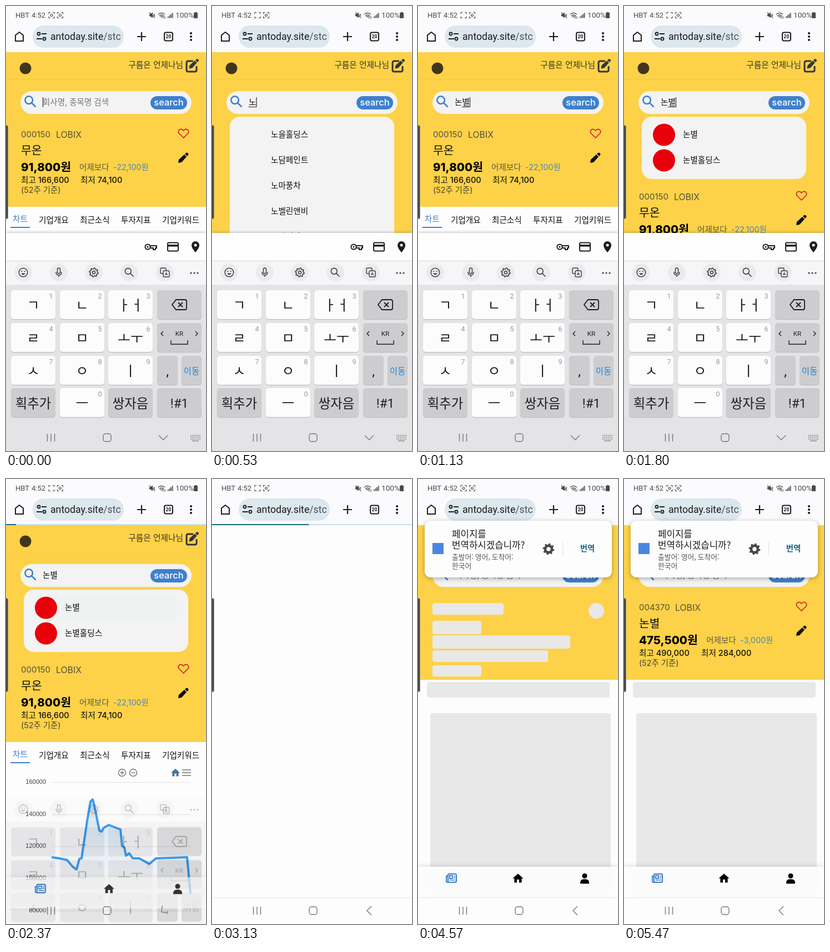
Animation of 360 by 800 pixels, one loop 5.51 s. Source, as an HTML page with a canvas:

```html
<!DOCTYPE html>
<html lang="ko">
<head>
<meta charset="utf-8">
<title>종목 검색</title>
<style>
html,body{margin:0;width:100%;height:100%;overflow:hidden;background:#fdfdfd}
canvas{display:block;width:360px;height:800px}
</style>
</head>
<body>
<canvas id="stage"></canvas>
<script>
const LOOP = 5510;
const cv = document.getElementById('stage');
const c = cv.getContext('2d');
const dpr = window.devicePixelRatio || 1;
cv.width = 360 * dpr;
cv.height = 800 * dpr;

const APP = 'Inter,"Noto Sans CJK KR",sans-serif';
const SYS = 'Roboto,"Noto Sans CJK KR",sans-serif';
const KOR = '"Noto Sans CJK KR","Noto Sans CJK",sans-serif';
const BLUE = '#3f80cc', INK = '#1d1d1f';

const TYPED = [[0, ''], [110, 'ㄴ'], [260, '노'], [640, '논'], [800, '논ㅂ'], [930, '논벼'], [1060, '논별']];
const LONG_LIST = ['노을홀딩스', '노담페인트', '노마풍차', '노벨린앤비', '노아린텍'];
const SHORT_LIST = ['논별', '논별홀딩스'];
const OLD = { code: '000150', x: 90, name: '무온', price: '91,800원', dx: 132, vx: 193, diff: '-22,100원', hi: '166,600', lx: 134, lo: '74,100' };
const NEW = { code: '004370', x: 92, name: '논별', price: '475,500원', dx: 148, vx: 209, diff: '-3,000원', hi: '490,000', lx: 139, lo: '284,000' };
const LINE = [[82,680],[96,682],[110,685],[120,697],[127,702],[132,683],[136,682],[146,615],[152,580],[156,576],[160,592],
  [168,632],[172,634],[176,627],[185,622],[206,630],[209,660],[213,662],[216,677],[222,673],[228,682],[240,682],
  [258,692],[270,682],[326,680],[332,745]];
const BAR = [[2340, 0], [2370, 18], [2800, 92], [3130, 174], [3700, 335], [3830, 335]];

const clamp = v => Math.max(0, Math.min(1, v));
const span = (t, a, b) => clamp((t - a) / (b - a));

function track(pts, t) {
  for (let i = 1; i < pts.length; i++) {
    const [a, u] = pts[i - 1], [b, v] = pts[i];
    if (t <= b) return u + (v - u) * span(t, a, b);
  }
  return pts[pts.length - 1][1];
}

function text(s, x, y, size, color = INK, font = APP, weight = 400, align = 'left') {
  c.font = `${weight} ${size}px ${font}`;
  c.fillStyle = color;
  c.textAlign = align;
  c.fillText(s, x, y + size * 0.365);
}
function rect(x, y, w, h, color) {
  c.fillStyle = color;
  c.fillRect(x, y, w, h);
}
function box(x, y, w, h, r, fill, stroke, lw = 2) {
  c.beginPath();
  c.roundRect(x, y, w, h, r);
  if (fill) { c.fillStyle = fill; c.fill(); }
  if (stroke) { c.strokeStyle = stroke; c.lineWidth = lw; c.stroke(); }
}
function disc(x, y, r, fill, stroke, lw = 2) {
  box(x - r, y - r, 2 * r, 2 * r, r, fill, stroke, lw);
}
// SVG path moved to x,y
function path(x, y, d, fill, stroke, lw = 2) {
  c.save();
  c.translate(x, y);
  const p = new Path2D(d);
  if (fill) { c.fillStyle = fill; c.fill(p, 'evenodd'); }
  if (stroke) { c.strokeStyle = stroke; c.lineWidth = lw; c.stroke(p); }
  c.restore();
}
function shadowed(blur, dy, color, draw) {
  c.save();
  c.shadowColor = color;
  c.shadowBlur = blur * dpr;
  c.shadowOffsetY = dy * dpr;
  draw();
  c.restore();
}
function magnifier(x, y, r, color, lw) {
  disc(x - r * 0.3, y - r * 0.3, r * 0.72, null, color, lw);
  path(x, y, `M${r * 0.25} ${r * 0.25}L${r} ${r}`, null, color, lw);
}
function gear(x, y, r, color, solid) {
  c.beginPath();
  for (let i = 0; i < 32; i++) {
    const a = (i + 0.5) / 32 * Math.PI * 2, q = i % 4 < 2 ? r : r * 0.77;
    c.lineTo(x + Math.cos(a) * q, y + Math.sin(a) * q);
  }
  c.closePath();
  if (solid) {
    c.moveTo(x + r * 0.36, y);
    c.arc(x, y, r * 0.36, 0, 7);
    c.fillStyle = color;
    c.fill('evenodd');
  } else {
    c.strokeStyle = color;
    c.lineWidth = 1.6;
    c.stroke();
    disc(x, y, r * 0.32, null, color, 1.5);
  }
}
function house(x, y, s, color) {
  c.save();
  c.translate(x, y);
  c.scale(s, s);
  path(0, 0, 'M0-9L10 0H7V8H2V2H-2V8H-7V0H-10Z', color);
  c.restore();
}
function pencil(x, y, s, color) {
  c.save();
  c.translate(x, y);
  c.scale(s, s);
  path(0, 0, 'M-9 9L-8 3L2-6L6-2L-3 8ZM3-7L5-9Q7-10 9-8Q10-6 9-5L7-3Z', color);
  c.restore();
}

function statusBar(t) {
  rect(0, 0, 360, 83, '#fbfbfd');
  const g = '#4a4a4c';
  text('HBT', 17, 16.5, 13, g, SYS);
  text('4:52', 46, 16.5, 13, g, SYS);
  [82, 97.5].forEach((x, i) => {
    path(x, 16.5, 'M-5-2V-5H-2M2-5H5V-2M5 2V5H2M-2 5H-5V2', null, g, 1.1);
    if (i || t < 300 || t >= 3830) disc(x, 16.5, 2, null, g, 1.1);
  });
  path(263, 16.5, 'M-5-2H-3L1-5V5L-3 2H-5Z', g);
  path(263, 16.5, 'M-5-5L5 5M2-2L5 2M5-2L2 2', null, g, 1.1);
  path(280, 17, 'M-6-2Q0-7 6-2M-4 1Q0-3 4 1M-2 3Q0 1 2 3', null, g, 1.4);
  path(284, 20, 'M-1-2V3M2 3V-2', null, g, 1);
  for (let i = 0; i < 4; i++) rect(291 + i * 2.6, 19 - i * 2.2, 1.7, 2.5 + i * 2.2, g);
  text('100%', 305, 16.5, 13.6, g, SYS);
  box(338, 12, 7, 10, 1, g);
  rect(340, 11, 3, 2, g);

  path(24, 55, 'M-7 8V-2.5L0-8L7-2.5V8Z', null, INK, 2);
  box(48, 35, 164, 40, 20, '#dce7ee');
  disc(59, 50, 2.5, null, INK, 1.8);
  disc(69, 59, 2.5, null, INK, 1.8);
  path(64, 55, 'M0-5H9M-9 4H1', null, INK, 1.9);
  text('antoday.site', 80, 55, 17.7, INK, SYS);
  const w = c.measureText('antoday.site').width;
  text('/stc', 80 + w, 55, 17.7, '#4b5459', SYS);
  path(244, 55, 'M-8 0H8M0-8V8', null, INK, 2.2);
  box(285, 47.5, 15, 15, 3, null, INK, 2);
  text('20', 292.5, 55, 8.5, INK, SYS, 700, 'center');
  for (const d of [-6, 0, 6]) disc(333, 55 + d, 2.1, INK);
}

function header(word, caret) {
  rect(0, 131, 360, 1, 'rgba(150,110,0,.1)');
  disc(35, 112, 10.5, '#41351b');
  text('구름은 언제나님', 319, 106, 14.7, '#3a3426', APP, 400, 'right');
  path(335, 107, 'M2-8H-7Q-10-8-10-5V8Q-10 11-7 11H5Q8 11 8 8V1', null, '#33343a', 3);
  pencil(338, 104, 0.95, '#33343a');

  box(26, 153, 308, 41, 20.5, '#f3f3f3');
  magnifier(44, 172, 9.5, BLUE, 2.6);
  if (word) text(word, 66, 173, 14.6, '#111', APP, 500);
  else text('회사명, 종목명 검색', 66, 173, 14.5, '#77777a', APP);
  if (caret) {
    c.font = `500 14.6px ${APP}`;
    const end = 66 + c.measureText(word).width;
    rect(end, 164, 1.2, 18, '#222');
    if (word) rect(end - 14, 181, 14, 1, '#222');
  }
  box(260, 162, 66, 24, 12, BLUE);
  text('search', 293, 173.5, 16.4, '#fff', APP, 500, 'center');
}

function stock(s, dy) {
  const y = v => v + dy;
  text(s.code, 27, y(231), 15, '#55503f');
  text('LOBIX', s.x, y(231), 15.8, '#55503f');
  text(s.name, 27, y(260), 20.5, '#111', APP, 500);
  text(s.price, 27, y(290), 20.5, '#000', APP, 800);
  text('어제보다', s.dx, y(290), 14.6, '#5f5940');
  text(s.diff, s.vx, y(290), 14.4, '#4f86b8');
  text('최고 ' + s.hi, 27, y(312.5), 14.6, '#111', APP, 500);
  text('최저 ' + s.lo, s.lx, y(312.5), 14.6, '#111', APP, 500);
  text('(52주 기준)', 27, y(331), 14.4, '#4a4433');
  path(319.5, y(229), 'M0 8L-8 0C-12-5-5-11 0-5C5-11 12-5 8 0Z', null, '#d0212b', 1.7);
  pencil(319, y(273), 1, '#111');
}

function tabs(dy) {
  [['차트', 12], ['기업개요', 59], ['최근소식', 133], ['투자지표', 207], ['기업키워드', 281]].forEach(([s, x], i) =>
    text(s, x, (i ? 384.5 : 383) + dy, 14.6, i ? '#111' : BLUE, APP, i ? 500 : 400));
  rect(8, 397 + dy, 35, 2, BLUE);
}

function chart(dy) {
  c.save();
  c.translate(0, dy - 112);
  const g = '#6e7479';
  for (const x of [209, 229]) {
    disc(x, 528, 6.5, null, g, 1.4);
    path(x, 528, x < 220 ? 'M-3.5 0H3.5M0-3.5V3.5' : 'M-3.5 0H3.5', null, g, 1.4);
  }
  house(305, 528, 0.8, '#49749c');
  path(325, 528, 'M-8-5H8M-8 0H8M-8 5H8', null, g, 1.7);
  for (let i = 0; i < 5; i++) {
    const y = 545 + i * 57.7;
    rect(82, y, 250, 1, '#e2e2e2');
    text(String(160000 - i * 20000), 72, y - 1, 11, '#444', '"Liberation Sans",sans-serif', 400, 'right');
  }
  c.beginPath();
  LINE.forEach(p => c.lineTo(...p));
  c.strokeStyle = '#3d9ff3';
  c.lineWidth = 4;
  c.lineJoin = 'round';
  c.stroke();
  c.lineTo(332, 776);
  c.lineTo(82, 776);
  const fade = c.createLinearGradient(0, 576, 0, 720);
  fade.addColorStop(0, 'rgba(61,159,243,.2)');
  fade.addColorStop(1, 'rgba(61,159,243,0)');
  c.fillStyle = fade;
  c.fill();
  c.restore();
}

function results(list, lit) {
  const short = list === SHORT_LIST;
  box(32, 199, 296, short ? 112 : 400, 18, '#f3f3f3');
  if (lit) rect(52, 208, 256, 44, '#eff2f2');
  list.forEach((s, i) => {
    const y = 230.5 + i * 46;
    if (short) disc(72, y + 1, 20, '#e8000b');
    text(s, 106, y, 14.6, '#111', APP, 500);
  });
}

function skeleton(withTop) {
  const g = '#e8e8e8';
  if (withTop) {
    [[223, 128, 21], [255, 88, 24], [281, 248, 24], [308, 208, 21], [335, 88, 20]]
      .forEach(([y, w, h]) => box(26, y, w, h, 4, g));
    disc(321, 237, 14, g);
  }
  box(16, 365, 329, 28, 4, g);
  box(22, 421, 325, 360, 4, g);
}

function bottomBar(off, alpha) {
  const k = 1 + off * 0.0016, y = 718 + off;
  shadowed(8, -2, 'rgba(0,0,0,.13)', () => rect(0, 697 + off, 360, 56, `rgba(254,254,254,${alpha})`));
  const x = 60 * k, px = 300 * k, ink = off ? '#333' : '#000';
  box(x - 6, y - 8, 15, 15, 2, null, BLUE, 2.2);
  path(x, y, 'M-6-4H-9V5Q-9 7-7 7H-4', null, BLUE, 2);
  box(x - 3, y - 5, 5, 5, 0, null, BLUE, 1.8);
  path(x, y, 'M4-4H7M4-1H7M-3 3H7', null, BLUE, 1.7);
  house(180 * k, y, 0.95, ink);
  disc(px, y - 4.5, 4.5, ink);
  box(px - 8, y + 1.5, 16, 8, [6, 6, 1, 1], ink);
}

// turn 0: chevron points down, 1: points left
function navBar(turn, bg) {
  if (bg) {
    rect(0, 752, 360, 48, bg);
    rect(0, 752, 360, 1, '#e6e6e6');
  }
  const g = '#77787a';
  path(81, 776, 'M-6.5-7V7M0-7V7M6.5-7V7', null, g, 1.4);
  box(175, 769, 14, 14, 4, null, g, 1.4);
  c.save();
  c.translate(283, 776);
  c.rotate(-Math.PI / 2 * (1 - turn));
  path(0, 0, 'M4-8L-4 0L4 8', null, g, 1.4);
  c.restore();
}

function keyCap(x, y, w, label, dark, size = 23, color = INK, font = KOR, weight = 400) {
  shadowed(1, 1, 'rgba(0,0,0,.2)', () => box(x, y, w, 52, 5, dark ? '#cdcdcf' : '#fcfcfd'));
  if (label) text(label, x + w / 2, y + 27, size, color, font, weight, 'center');
}

function keyboard() {
  rect(0, 457, 360, 44, '#f6f6f8');
  rect(0, 501, 360, 299, '#e4e4e6');
  const g = '#3c3d40', y = 479;
  for (const x of [31, 95, 158, 222, 286]) disc(x, y, 16, '#ebebed');
  disc(31, y, 7.8, null, g, 1.5);
  disc(28.3, 477, 1.1, g);
  disc(33.7, 477, 1.1, g);
  path(31, y, 'M-4 1.5Q0 7 4 1.5Z', g);
  box(92.5, 471, 5, 10, 2.5, null, g, 1.5);
  path(95, y, 'M-5-1Q-5 5 0 5Q5 5 5-1M0 5V8', null, g, 1.5);
  gear(158, y, 8, g);
  magnifier(222, y, 7.5, g, 1.6);
  box(278, 471, 10, 10, 2, null, g, 1.4);
  box(283, 476, 11, 11, 2, '#ebebed', g, 1.4);
  text('A', 288.5, 481.5, 8, g, SYS, 700, 'center');
  for (const d of [-6, 0, 6]) disc(339 + d, y + 1, 1.6, g);

  const cols = [9, 97, 184], rows = [511, 570, 629, 687];
  ['ㄱ', 'ㄴ', 'ㅏㅓ', 'ㄹ', 'ㅁ', 'ㅗㅜ', 'ㅅ', 'ㅇ', 'ㅣ', '획추가', 'ㅡ', '쌍자음'].forEach((s, i) => {
    const x = cols[i % 3], ky = rows[i / 3 | 0], digit = i < 9 ? i + 1 : i === 10 ? 0 : '';
    const word = s.length === 3;
    keyCap(x, ky, 80, s, word, word ? 23.4 : 25, INK, KOR, word ? 400 : 500);
    text(String(digit), x + 72, ky + 10, 12.5, '#98989b', SYS, 400, 'center');
  });
  keyCap(272, 511, 80, '', true);
  path(312, 537, 'M-13 0L-6-9H10Q13-9 13-6V6Q13 9 10 9H-6ZM-2-4L6 4M6-4L-2 4', null, INK, 1.8);
  keyCap(272, 570, 80, '', true);
  text('KR', 312, 589, 11.5, INK, SYS, 400, 'center');
  path(312, 589, 'M-15 12V19H15V12', null, INK, 1.4);
  path(312, 589, 'M-29-4L-33 0L-29 4M29-4L33 0L29 4', null, INK, 1.4);
  keyCap(272, 629, 37, ',', true, 24, INK, SYS);
  keyCap(316, 629, 36, '이동', true, 15.5, '#1a86e0');
  keyCap(272, 687, 80, '!#1', true, 22.5, INK, SYS);
  for (let r = 0; r < 3; r++)
    for (let i = 0; i < 6; i++) rect(332 + i * 3.2, 771 + r * 3.4, 1.8, 1.8, '#8c8d8f');
  rect(335, 781, 12, 1.5, '#8c8d8f');
}

function autofillRow() {
  shadowed(5, -1, 'rgba(0,0,0,.25)', () => rect(0, 408, 360, 49, '#fefefe'));
  disc(255, 433, 4.6, null, INK, 2);
  disc(255, 433, 1.6, INK);
  path(260, 433, 'M0-2H11V2H9V5H5V2H0', null, INK, 2);
  box(291, 425.5, 19, 15, 2, null, INK, 2);
  rect(291, 429, 19, 3.5, INK);
  path(341, 433, 'M0 10C-4 5-7 1-7-3A7 7 0 0 1 7-3C7 1 4 5 0 10ZM0-5.6A2.6 2.6 0 1 0 .1-5.6Z', INK);
}

function translateCard(t) {
  const rise = 1 - span(t, 3870, 4110);
  const dy = -45 * rise * rise;
  c.save();
  c.globalAlpha = span(t, 3870, 3990);
  shadowed(9, 2, 'rgba(0,0,0,.3)', () => box(12, 75 + dy, 337, 102 + Math.max(-10, dy * 2), 11, '#fdfdfe'));
  c.translate(0, dy);
  rect(26, 115, 20, 20, '#4a86e0');
  text('페이지를', 61, 98.5, 16.8, INK, KOR);
  text('번역하시겠습니까?', 61, 119, 16.8, INK, KOR);
  text('출발어: 영어, 도착어:', 61, 140, 12.8, '#55565a', KOR);
  text('한국어', 61, 156, 12.8, '#55565a', KOR);
  gear(235, 126, 10.5, '#47484b', true);
  rect(260, 113, 1, 26, '#e2e2e4');
  text('번역', 305, 125, 14.4, '#1b6580', KOR, 700, 'center');
  c.restore();
}

function searchPage(t) {
  const word = TYPED.filter(e => e[0] <= t).pop()[1];
  const list = t >= 400 && t < 760 ? LONG_LIST : t >= 1270 ? SHORT_LIST : null;
  const dy = list ? (list === SHORT_LIST ? 112 : 410) : 0;
  const hide = span(t, 2230, 2470);
  rect(0, 83, 360, 278 + dy, '#fdd248');
  header(word, t < 2160);
  stock(OLD, dy);
  tabs(dy);
  if (hide > 0) chart(dy);
  if (list) results(list, t >= 2130);
  if (hide <= 0) {
    keyboard();
    autofillRow();
    navBar(0);
    return;
  }
  if (hide < 1) {
    c.save();
    c.globalAlpha = clamp(1 - 1.2 * hide);
    c.globalCompositeOperation = 'multiply';
    c.translate(0, 195 * hide);
    keyboard();
    c.restore();
  }
  bottomBar(Math.min(19, 19 * (1 - span(t, 2370, 2470))), hide < 1 ? 0.65 : 0.96);
  navBar(hide, hide < 1 ? null : '#fdfdfd');
}

function resultPage(t) {
  const ready = t >= 4800;
  rect(0, 83, 360, 278, '#fdd248');
  header('', false);
  skeleton(!ready);
  if (ready) stock(NEW, 0);
  bottomBar(0, 0.95);
}

function draw(t) {
  c.setTransform(dpr, 0, 0, dpr, 0, 0);
  rect(0, 0, 360, 800, '#fdfdfd');
  if (t < 2830) searchPage(t);
  else {
    if (t >= 3830) resultPage(t);
    navBar(1, '#fdfdfd');
  }
  statusBar(t);
  if (t >= 2340 && t < 3830) {
    rect(0, 81, 360, 2, '#cbdfe3');
    rect(0, 81, track(BAR, t), 2, '#15697d');
  }
  box(-4, 214, 8, 169, 3, '#8a8a88');
  box(-4, 215, 7, 167, 3, '#454547');
  if (t >= 3870) translateCard(t);
}

function tick() {
  draw(performance.now() % LOOP);
  requestAnimationFrame(tick);
}
tick();
</script>
</body>
</html>
```
